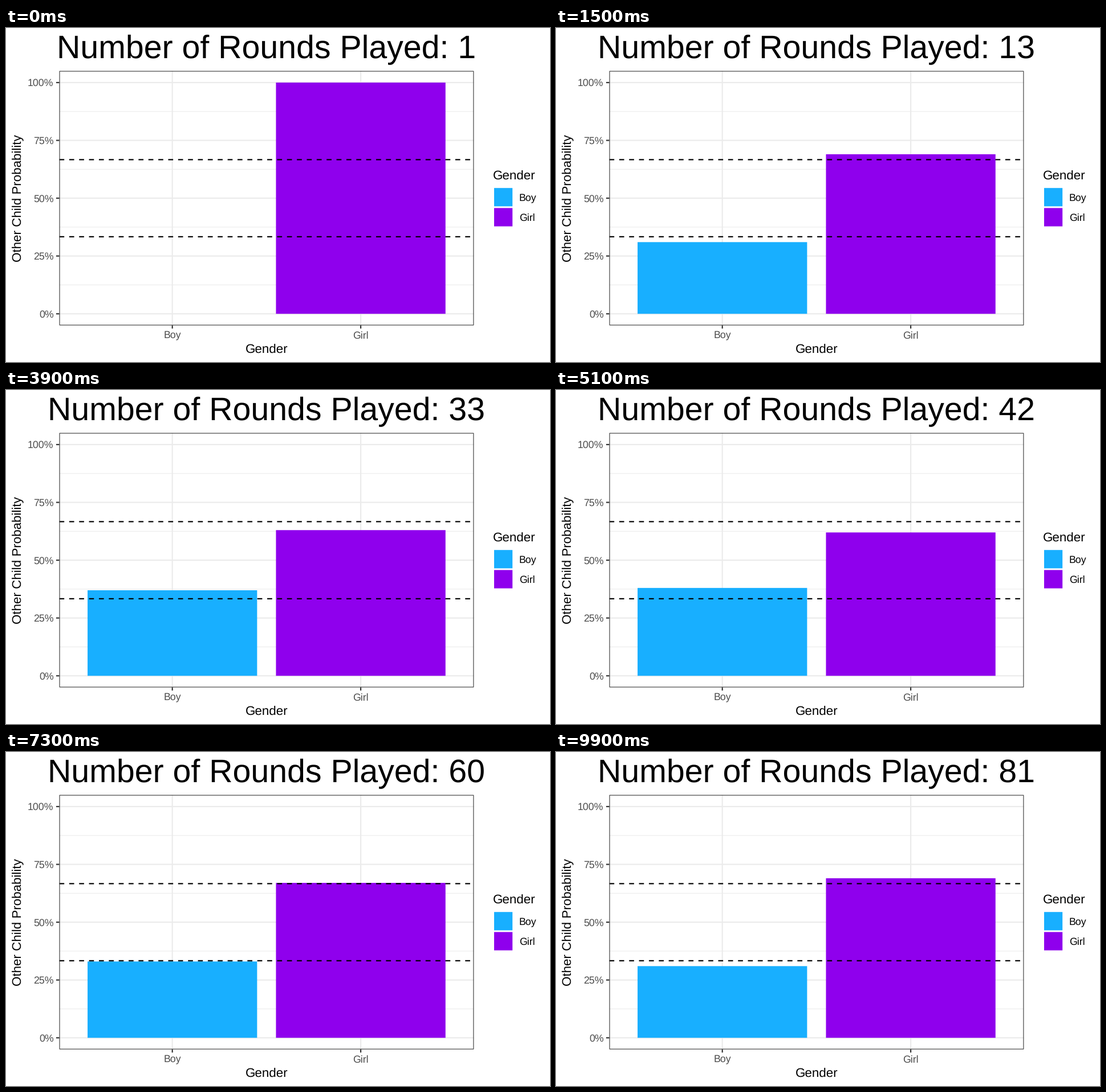
A matplotlib script for the animation above (10 s loop, 954x587 px).

```python
import numpy as np
import matplotlib.pyplot as plt
from matplotlib.animation import FuncAnimation
from matplotlib.patches import Rectangle

W, H, DPI = 954, 587, 64
FRAMES, ROUNDS = 100, 81
PT = 72 / DPI                      # points per pixel
LINE = 2.17                        # main line width in pixels

LEFT, RIGHT, TOP, BOTTOM = 93.5, 820.4, 75.5, 522.6
BASE, SPAN = 502.3, 406.4          # 0% level and height of 100%
BAR_W = 297.3
CENTERS = {"Boy": 291.7, "Girl": 622.1}
COLORS = {"Boy": "#18afff", "Girl": "#8f00ed"}

plt.rcParams.update({"font.family": "Liberation Sans", "text.hinting": "none"})

fig = plt.figure(figsize=(W / DPI, H / DPI), dpi=DPI, facecolor="white")
ax = fig.add_axes([0, 0, 1, 1])
ax.set(xlim=(0, W), ylim=(H, 0))
ax.axis("off")


def level(p):
    return BASE - SPAN * p


def line(x, y, color, width=LINE, z=1, **kw):
    ax.plot(x, y, color=color, lw=width * PT, zorder=z,
            solid_capstyle="butt", dash_capstyle="butt", snap=False, **kw)


def rect(x, y, w, h, z=2, **kw):
    return ax.add_patch(Rectangle((x, y), w, h, zorder=z, snap=False, **kw))


def label(x, y, s, size, color="black", ha="left", **kw):
    return ax.text(x, y, s, fontsize=size * PT, color=color, ha=ha,
                   va="baseline", rotation_mode="anchor", **kw)


# Grid, ticks and tick labels
for p in np.arange(0.125, 1, 0.25):
    line([LEFT, RIGHT], [level(p)] * 2, "#ebebeb", LINE / 2)
for p in np.linspace(0, 1, 5):
    y = level(p)
    line([LEFT, RIGHT], [y, y], "#ebebeb")
    line([LEFT - 5.6, LEFT], [y, y], "#333333")
    label(83.5, y + 6.3, f"{p:.0%}", 17.8, "#4d4d4d", "right")
for name, x in CENTERS.items():
    line([x, x], [TOP, BOTTOM], "#ebebeb")
    line([x, x], [BOTTOM, BOTTOM + 5.6], "#333333")
    label(x, 545.7, name, 17.8, "#4d4d4d", "center")

# Reference lines and panel border
for p in (1 / 3, 2 / 3):
    line([LEFT, RIGHT], [level(p)] * 2, "black", z=3, ls=(0, (4, 4)))
rect(LEFT + 0.5, TOP + 0.5, RIGHT - LEFT - 1, BOTTOM - TOP - 1, z=4,
     fill=False, ec="#333333", lw=1.1 * PT)

# Axis titles and legend
label(457, 572, "Gender", 22.4, ha="center")
label(27.5, 299.5, "Other Child Probability", 22.4, ha="center", rotation=90)
label(853.7, 267, "Gender", 22.4)
for i, name in enumerate(COLORS):
    y = 281.2 + 35.2 * i
    rect(856, y, 32.2, 32.2, fc=COLORS[name], lw=0)
    label(899.7, y + 22.7, name, 17.8)

title = label(456.8, 53, "", 57.2, ha="center")
bars = {n: rect(x - BAR_W / 2, BASE, BAR_W, 0, fc=COLORS[n], lw=0)
        for n, x in CENTERS.items()}

# Running share of girls, rounded to whole percent after each round
rounds = np.arange(1, ROUNDS + 1)
girls = np.round(np.interp(rounds, [1, 13, 24, 42, 53, 67, 81],
                           [1, 9, 16, 26, 35, 45, 56]))
share = np.round(girls / rounds, 2)
keys = np.round((rounds - 1) * (FRAMES - 1) / (ROUNDS - 1))


def update(k):
    played = round(1 + (ROUNDS - 1) * k / (FRAMES - 1))
    girl = np.interp(k, keys, share)
    title.set_text(f"Number of Rounds Played: {played}")
    for name, p in (("Boy", 1 - girl), ("Girl", girl)):
        bars[name].set_height(-SPAN * p)
        bars[name].set_visible(p > 0)
    return [title, *bars.values()]


anim = FuncAnimation(fig, update, frames=FRAMES, interval=100,
                     repeat=True, repeat_delay=0, blit=False)
plt.show()
```
